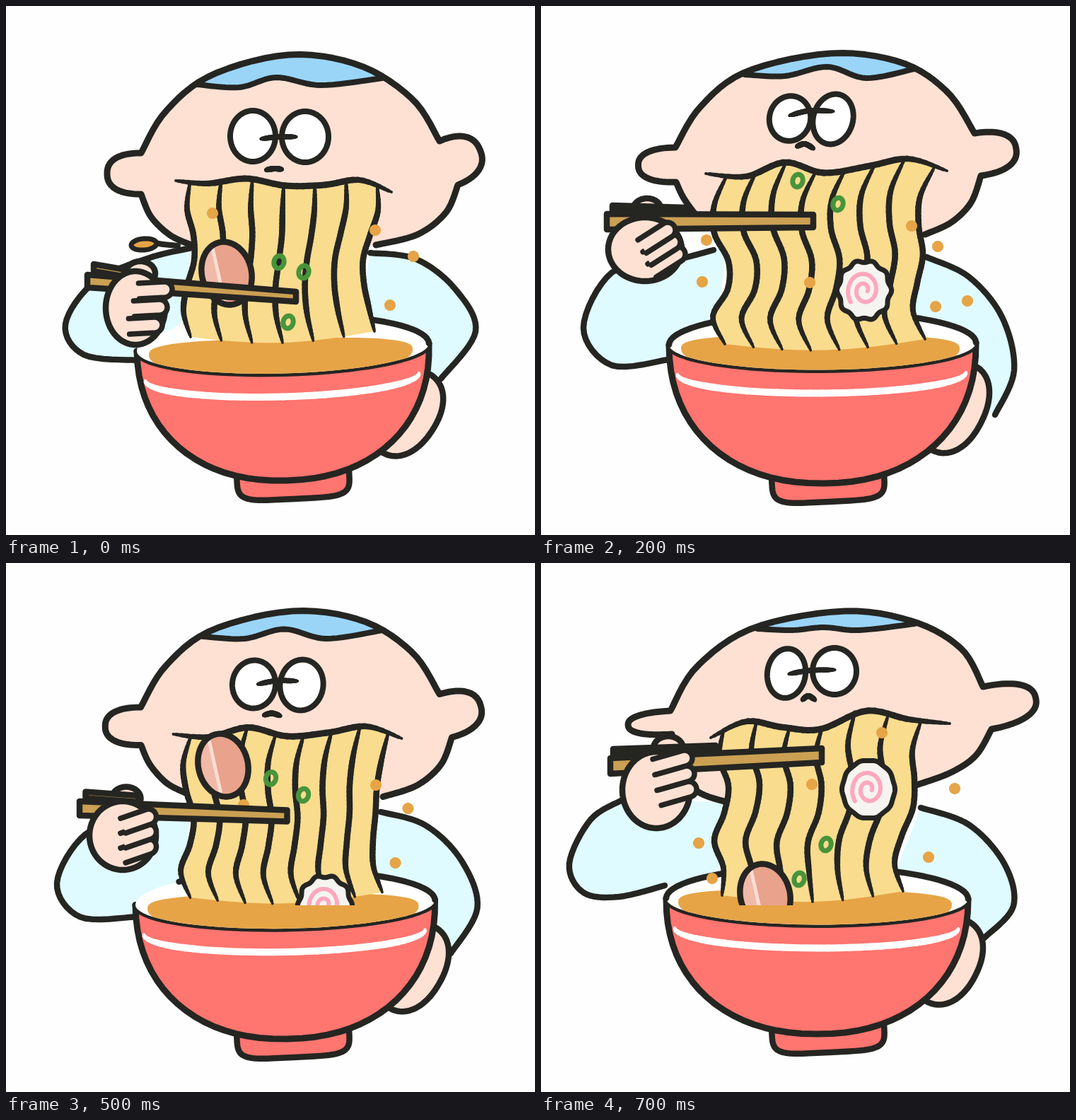
Recreate the animation shown at these times as an HTML page with a canvas. Size 748 by 748 pixels, loop 800 ms.

```html
<!DOCTYPE html>
<html lang="en">
<head>
<meta charset="utf-8">
<title>Noodle slurp</title>
<style>
html, body { margin: 0; width: 100%; height: 100%; overflow: hidden; background: #fefefe; }
canvas { display: block; width: 748px; height: 748px; }
</style>
</head>
<body>
<canvas id="stage" width="748" height="748"></canvas>
<script>
const ctx = document.getElementById('stage').getContext('2d');
const INK = '#252522', SKIN = '#ffe1d3', SHIRT = '#dffbff', HAIR = '#9ad5f8', NOODLE = '#f9dc8e',
  SOUP = '#e6a446', BOWL = '#ff756f', WOOD = '#cba053', GREEN = '#48943a', PINK = '#ffa8bd';
const STEP = 100, SAMPLES = 40, SOUP_LINE = 484;

// Key points of each pose, as x, y pairs unless noted.
const dip = {
  crown: [191, 208, 225, 150, 290, 98, 400, 69, 500, 84, 575, 132, 613, 191],
  cheekL: [191, 266, 205, 298, 232, 324, 262, 338], cheekR: [639, 253, 622, 292, 582, 323, 523, 338],
  ears: [48, 48],
  fringe: [270, 111, 330, 115, 382, 101, 445, 112, 532, 102],
  eyes: [[349, 184, 32, 36, 0], [423, 185, 33, 36, 0]],
  squint: [360, 188, 385, 185, 411, 185], nose: [367, 232, 379, 230, 391, 231],
  mouth: [240, 247, 285, 251, 340, 244, 395, 254, 450, 253, 500, 246, 545, 263],
  edgeL: [260, 256, 265, 266, 256, 251, 261], edgeR: [525, 526, 515, 505, 506, 513, 521],
  span: [254, 468, 255, 460], strands: 6,
  sleeveL: [262, 342, 200, 357, 125, 390, 84, 450, 110, 493, 185, 501],
  sleeveR: [515, 349, 580, 358, 635, 400, 664, 460, 615, 527],
  handR: [600, 521, 530, 630],
  rim: [185, 488, 598, 477], rimFrom: 0.5, base: 671,
  thumb: [190, 378, 21, 17], palm: [183, 427, 42, 52], tip: [224, 401], gap: [-7, 25], finger: [-36, 2],
  stick: [115, 389, 410, 411, 9, 7], backStick: [124, 370, 170, 378, 5, 5],
  onions: [386, 362, 421, 376, 399, 447],
  drops: [292, 293, 522, 317, 576, 354, 543, 423],
  meat: 1, splash: true
};
const pull = {
  crown: [190, 200, 225, 143, 290, 93, 410, 67, 510, 80, 575, 122, 613, 180],
  cheekL: [191, 249, 202, 272, 222, 298, 245, 312], cheekR: [622, 240, 608, 278, 580, 306, 543, 323],
  ears: [53, 55],
  fringe: [288, 97, 345, 99, 405, 86, 460, 102, 528, 89],
  eyes: [[352, 159, 29, 32, 15], [413, 160, 28, 36, 16]],
  squint: [351, 155, 380, 148, 414, 149], nose: [361, 199, 373, 195, 386, 202],
  mouth: [233, 237, 290, 241, 345, 221, 400, 236, 465, 226, 520, 216, 574, 233],
  edgeL: [262, 245, 245, 265, 264, 243, 260], edgeR: [556, 536, 534, 540, 532, 526, 543],
  span: [247, 478, 235, 471], strands: 7,
  sleeveL: [244, 345, 175, 363, 100, 377, 60, 455, 100, 508, 180, 500],
  sleeveR: [545, 355, 605, 383, 652, 440, 669, 515, 642, 578],
  handR: [612, 508, 553, 628],
  rim: [181, 479, 615, 476], rimFrom: 0, base: 675,
  thumb: [150, 288, 20, 16], palm: [147, 344, 52, 45], tip: [179, 317], gap: [7, 17], finger: [-36, 23],
  stick: [93, 305, 385, 304, 11, 9], backStick: [101, 286, 205, 289, 4, 4],
  onions: [363, 247, 420, 280],
  drops: [380, 391, 524, 311, 561, 340, 558, 425, 234, 331, 228, 390, 603, 417],
  naruto: 1
};
const high = {
  crown: [183, 209, 220, 147, 300, 92, 430, 68, 530, 84, 595, 122, 625, 175],
  cheekL: [185, 242, 195, 285, 220, 322, 262, 338], cheekR: [637, 235, 615, 272, 580, 296, 531, 314],
  ears: [61, 70],
  fringe: [306, 93, 355, 95, 400, 91, 450, 95, 528, 86],
  eyes: [[347, 156, 27, 35, 8], [415, 153, 31, 33, 0]],
  squint: [350, 157, 380, 152, 416, 151], nose: [369, 194, 378, 188, 388, 194],
  mouth: [240, 247, 290, 224, 340, 232, 395, 235, 460, 209, 520, 221, 578, 227],
  edgeL: [258, 252, 265, 259, 245, 258, 256], edgeR: [537, 525, 528, 526, 510, 500, 512],
  span: [238, 470, 232, 464], strands: 6,
  sleeveL: [115, 335, 70, 363, 40, 425, 60, 466, 110, 472, 175, 456],
  sleeveR: [537, 346, 605, 370, 655, 425, 668, 485, 627, 530],
  handR: [603, 506, 545, 620],
  rim: [177, 474, 604, 475], rimFrom: 0, base: 666,
  thumb: [180, 262, 21, 17], palm: [163, 321, 48, 54], tip: [203, 276], gap: [3, 22], finger: [-42, 12],
  stick: [98, 287, 397, 272, 11, 10], backStick: [102, 267, 247, 262, 4, 4],
  onions: [403, 398, 365, 447],
  drops: [383, 313, 482, 240, 585, 319, 548, 416, 242, 446, 223, 396],
  meat: 0, naruto: 2
};
function blend(a, b) {
  if (Array.isArray(a)) return a.slice(0, b.length).map((v, i) => blend(v, b[i]));
  return (a + b) / 2;
}
const rise = {};
for (const key in dip) if (key in pull) rise[key] = blend(dip[key], pull[key]);
Object.assign(rise, { meat: 2, naruto: 0 });
const poses = [dip, rise, pull, high];

const lerp = (a, b, t) => a + (b - a) * t;
const pairs = flat => flat.filter((_, i) => i % 2 === 0).map((x, i) => [x, flat[2 * i + 1]]);

// Smooth curve through key points.
function curve(p) {
  const out = [], last = p.length - 1;
  for (let s = 0; s <= SAMPLES; s++) {
    const u = s / SAMPLES * last, i = Math.min(Math.floor(u), last - 1), t = u - i;
    const a = p[Math.max(i - 1, 0)], b = p[i], c = p[i + 1], d = p[Math.min(i + 2, last)];
    out.push([0, 1].map(k => b[k] + t / 2 * (c[k] - a[k]
      + t * (2 * a[k] - 5 * b[k] + 4 * c[k] - d[k] + t * (3 * (b[k] - c[k]) + d[k] - a[k])))));
  }
  return out;
}
const bend = flat => curve(pairs(flat));

// Half superellipse from p to q, bulging to the left of the way; n sets how square it is.
function bump(p, q, depth, n = 2) {
  const out = [], dx = q[0] - p[0], dy = q[1] - p[1], len = Math.hypot(dx, dy);
  const round = v => Math.sign(v) * Math.abs(v) ** (2 / n);
  for (let i = 0; i <= SAMPLES; i++) {
    const a = Math.PI * i / SAMPLES;
    const u = (1 - round(Math.cos(a))) / 2, v = depth * round(Math.sin(a)) / len;
    out.push([p[0] + dx * u + dy * v, p[1] + dy * u - dx * v]);
  }
  return out;
}
function ring(x, y, rx, ry = rx, tilt = 0, wave = 0) {
  const out = [], r = tilt * Math.PI / 180;
  for (let i = 0; i <= 100; i++) {
    const a = i / 50 * Math.PI, k = 1 + wave * Math.cos(10 * a);
    const u = rx * k * Math.cos(a), v = ry * k * Math.sin(a);
    out.push([x + u * Math.cos(r) - v * Math.sin(r), y + u * Math.sin(r) + v * Math.cos(r)]);
  }
  return out;
}

function trace(pts) {
  ctx.beginPath();
  pts.forEach(p => ctx.lineTo(p[0], p[1]));
}
function fill(color, pts) {
  trace(pts);
  ctx.fillStyle = color;
  ctx.fill();
}
function ink(pts, w = 8.5, color = INK) {
  trace(pts);
  ctx.lineWidth = w;
  ctx.strokeStyle = color;
  ctx.stroke();
}
function blob(color, pts, w) {
  fill(color, pts);
  ink(pts, w);
}
// Line that thins towards both ends.
function brush(pts, w = 8.5, color = INK) {
  const n = pts.length - 1;
  for (let i = 0; i < n; i++) {
    const ease = Math.min(1, Math.sqrt(Math.sin(Math.PI * (i + 0.5) / n)) * 1.25);
    ink([pts[i], pts[i + 1]], w * (0.25 + 0.75 * ease), color);
  }
}
function clipped(pts, paint) {
  ctx.save();
  trace(pts);
  ctx.clip();
  paint();
  ctx.restore();
}

function drawArms(p) {
  const left = bend(p.sleeveL), right = bend(p.sleeveR);
  fill(SHIRT, [...left, [250, 445], [262, 338]]);
  ink(left);
  fill(SHIRT, [...right, [560, 540], [500, 440]]);
  ink(right);
  const [from, to] = pairs(p.handR);
  blob(SKIN, bump(from, to, 45, 2.2));
}

function drawHead(p) {
  const crown = bend(p.crown), cheekL = bend(p.cheekL), cheekR = bend(p.cheekR);
  const earL = bump(cheekL[0], crown[0], p.ears[0], 2.4);
  const earR = bump(crown.at(-1), cheekR[0], p.ears[1], 2.4);
  const outline = [...cheekL.slice().reverse(), ...earL, ...crown, ...earR, ...cheekR];
  const fringe = bend(p.fringe);
  fill(SKIN, outline);
  clipped(outline, () => {
    fill(HAIR, [...fringe, [fringe.at(-1)[0], 0], [fringe[0][0], 0]]);
    ink(fringe, 8);
  });
  ink(outline, 9);
  p.eyes.forEach(e => blob('#fff', ring(...e), 8));
  brush(bend(p.squint), 7.5);
  brush(bend(p.nose), 8);
}

function drawRim(p) {
  const [l, r] = pairs(p.rim);
  const back = bump(l, r, 45), front = bump(r, l, 37);
  fill('#fff', [...back, ...front]);
  ink(back.slice(Math.round(p.rimFrom * SAMPLES)));
  const a = [l[0] + 17, l[1] + 6], b = [r[0] - 23, r[1] + 9];
  clipped([...back, ...front], () => fill(SOUP, [...bump(a, b, 20, 3), ...bump(b, a, 40)]));
}

// Strand at a fraction f of the way from the left edge to the right one.
function strand(p, f) {
  const [lt, lb, rt, rb] = p.span, mouth = bend(p.mouth);
  const edge = (xs, top, end) => curve(xs.map((x, i) => [x, lerp(top, end, i / 6)]));
  const l = edge(p.edgeL, lt, lb), r = edge(p.edgeR, rt, rb);
  const x0 = lerp(l[0][0], r[0][0], f);
  const lift = mouth.find(m => m[0] >= x0)[1] - lerp(lt, rt, f);
  return l.map((a, i) => {
    const t = i / SAMPLES;
    return [lerp(a[0], r[i][0], f),
      lerp(a[1], r[i][1], f) + lift * (1 - t) ** 2 + 12 * Math.sin(Math.PI * f) * t * t];
  });
}
function drawNoodles(p) {
  const all = Array.from({ length: 21 }, (_, i) => strand(p, i / 20));
  fill(NOODLE, [...all[0], ...all.map(s => s.at(-1)), ...all[20].slice().reverse(),
    ...all.map(s => s[0]).reverse()]);
  const n = Math.round(p.strands);
  for (let i = 0; i <= n; i++) brush(strand(p, i / n));
  brush(bend(p.mouth), 9);
}

function drawMeat(k) {
  const x = 317 - 5 * k, y = 470 - 92 * k, body = ring(x, y, 35, 45, -14);
  fill('#e9a28b', body);
  clipped(body, () => {
    ink([[x - 34, y - 36], [x - 18, y + 40]], 32, '#f0b9a8');
    ink([[x - 20, y - 36], [x - 3, y + 40]], 5, '#f9dcd3');
  });
  ink(body);
}
function drawNaruto(k) {
  const x = 451 + 6 * k, y = 484 - 82 * k, swirl = [];
  blob('#f6f4f0', ring(x, y, 37, 41, 0, k > 1 ? 0.015 : 0.045), 7);
  for (let t = 0; t <= 1; t += 0.02) {
    const a = 2.5 + t * 10.5, s = 1 - 0.82 * t;
    swirl.push([x + 24 * s * Math.cos(a), y + 28 * s * Math.sin(a)]);
  }
  ink(swirl, 6, PINK);
}
function drawToppings(p) {
  clipped([[0, 0], [748, 0], [748, SOUP_LINE], [0, SOUP_LINE]], () => {
    if ('meat' in p) drawMeat(p.meat);
    if ('naruto' in p) drawNaruto(p.naruto);
  });
  pairs(p.onions).forEach(([x, y]) => ink(ring(x, y, 7, 9, 15), 7, GREEN));
  pairs(p.drops).forEach(([x, y]) => fill(SOUP, ring(x, y, 8)));
  if (p.splash) {
    brush([[205, 334], [222, 337], [243, 339]], 8);
    blob(SOUP, ring(195, 337, 18, 8, -5), 7);
  }
}

function drawStick([x, y, x2, y2, w, w2]) {
  blob(WOOD, [[x, y - w], [x2, y2 - w2], [x2, y2 + w2], [x, y + w], [x, y - w]]);
}
function drawFist(p) {
  blob(SKIN, ring(...p.thumb));
  drawStick(p.backStick);
  drawStick(p.stick);
  blob(SKIN, ring(...p.palm));
  const [bx, by] = p.finger, k = 11 / Math.hypot(bx, by), side = [by * k, -bx * k];
  for (let i = 2; i >= 0; i--) {
    const at = (s, root) => [
      p.tip[0] + p.gap[0] * i + side[0] * s + bx * root,
      p.tip[1] + p.gap[1] * i + side[1] * s + by * root];
    blob(SKIN, [at(-1, 1), ...bump(at(-1, 0), at(1, 0), 11), at(1, 1)], 7.5);
  }
}

function drawBowl(p) {
  const [l, r] = pairs(p.rim), b = p.base;
  blob(BOWL, bump([485, b - 16], [326, b - 8], 38, 5));
  const front = bump(r, l, 37), body = bump(r, l, b - (l[1] + r[1]) / 2, 2.2);
  fill(BOWL, body);
  ink(body, 9);
  fill('#fff', [...front, ...bump(l, r, 1)]);
  clipped([...front, l, r], () => drawRimFront(p));
  ink(front, 9);
  brush(bump([r[0] - 14, r[1] + 42], [l[0] + 12, l[1] + 42], 28), 10, '#fff');
}

function draw(p) {
  ctx.fillStyle = '#fefefe';
  ctx.fillRect(0, 0, 748, 748);
  ctx.lineCap = ctx.lineJoin = 'round';
  drawArms(p);
  drawHead(p);
  drawBowl(p);
  drawRim(p);
  drawNoodles(p);
  drawToppings(p);
  drawFist(p);
}
// The inside below the rim line, seen over the front wall.
function drawRimFront(p) {
  const [l, r] = pairs(p.rim);
  fill(SOUP, [...bump(l, r, 1), ...bump(r, l, 37)]);
}

let shown;
function tick(now) {
  const pose = poses[Math.floor(now / STEP) % poses.length];
  if (pose !== shown) draw(shown = pose);
  requestAnimationFrame(tick);
}
draw(dip);
requestAnimationFrame(tick);
</script>
</body>
</html>
```
